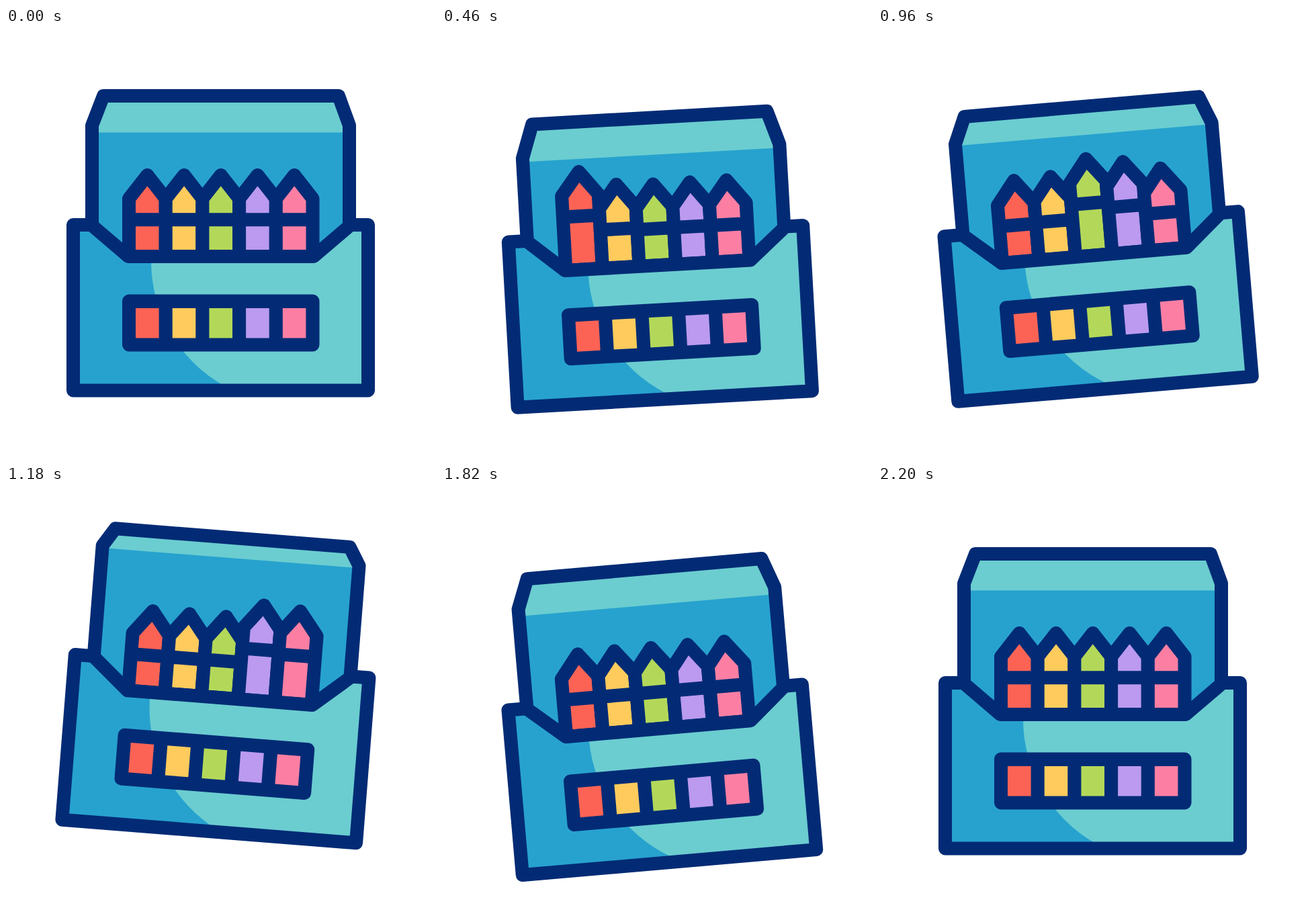
Animation, 640 px wide and 640 px high, one loop 2.4 s. Source, as an HTML page:

```html
<!DOCTYPE html>
<html lang="en">
<head>
<meta charset="utf-8">
<title>Crayon box</title>
<style>
  html, body { margin: 0; width: 100%; height: 100%; overflow: hidden; background: #fff; }
  svg { display: block; width: 100%; height: 100%; }
  .line { stroke: #032b75; stroke-width: 20; stroke-linejoin: round; stroke-linecap: round; }
</style>
</head>
<body>
<svg viewBox="0 0 640 640">
  <g id="box">
    <path id="lid" fill="#6bcdd0"/>
    <path id="inside" fill="#27a2ce"/>
    <path id="lidLine" class="line" fill="none"/>
    <g id="crayons"></g>
    <path fill="#27a2ce" d="M100 293H127L182 340H458L513 293H539V539.5H100z"/>
    <path fill="#6bcdd0" d="M216 347A213 213 0 0 0 335 538H539V293H513L458 340H216z"/>
    <path class="line" fill="none" d="M100 293H127L182 340H458L513 293H539V539.5H100z"/>
    <rect x="173" y="396.5" width="293.5" height="85" rx="10" fill="#032b75"/>
    <g id="swatches"></g>
  </g>
</svg>
<script>
const LOOP = 2400, STEP = 20, START = 200;
const COLORS = ['#fd6355', '#fecb5c', '#b3d859', '#bb9af0', '#fc7fa3'];
const GAP = 54.7, RISE = 26, RISE_TIME = 300, STAGGER = 200;

// Keyframes are [time, value] pairs
const TURN = [[200, 0], [800, -8], [1400, 10], [1800, -5], [2200, 0]];
const SHIFT = [[200, 0], [700, 25], [1200, -25], [1700, 25], [2200, 0]];
const lidKeys = (rest, low, high) => [[200, rest], [700, low], [1200, high], [1700, rest]];
const LID_TOP = lidKeys(101, 137, 101);
const LID_CORNER = lidKeys(145, 192, 127.5);
const LID_FOLD = lidKeys(155.5, 193, 131);

const $ = id => document.getElementById(id);

function add(parent, tag, attrs) {
  const el = document.createElementNS('http://www.w3.org/2000/svg', tag);
  for (const name in attrs) el.setAttribute(name, attrs[name]);
  return parent.appendChild(el);
}

function at(keys, t) {
  if (t <= keys[0][0]) return keys[0][1];
  for (let i = 1; i < keys.length; i++) {
    const [t0, a] = keys[i - 1], [t1, b] = keys[i];
    if (t < t1) {
      const u = (t - t0) / (t1 - t0);
      return a + (b - a) * u * u * (3 - 2 * u);
    }
  }
  return keys[keys.length - 1][1];
}

const crayons = COLORS.map((fill, i) => {
  add($('swatches'), 'rect', { x: 193 + i * GAP, y: 417, width: 34.6, height: 44.5, fill });
  const begin = START + i * STAGGER, peak = begin + RISE_TIME;
  return {
    x: 183 + i * GAP,
    keys: [[begin, 0], [peak, RISE], [peak + RISE_TIME, 0]],
    path: add($('crayons'), 'path', { class: 'line', fill })
  };
});

function draw(t) {
  $('box').setAttribute('transform',
    `translate(0 ${at(SHIFT, t)}) rotate(${at(TURN, t)} 320 320)`);

  const top = at(LID_TOP, t), corner = at(LID_CORNER, t), fold = at(LID_FOLD, t);
  const lid = `M128 293V${corner}L145 ${top}H495L511 ${corner}V293`;
  $('lid').setAttribute('d', lid);
  $('lidLine').setAttribute('d', lid);
  $('inside').setAttribute('d', `M128 ${fold}H511V293L458 340H182L128 293z`);

  for (const { x, keys, path } of crayons) {
    const up = at(keys, t), right = x + GAP;
    path.setAttribute('d',
      `M${x} 340V${254 - up}L${x + GAP / 2} ${219 - up}L${right} ${254 - up}V340z` +
      `M${x} ${285.3 - up}H${right}`);
  }
}

function tick() {
  const t = performance.now() % LOOP;
  draw(t - t % STEP);
  requestAnimationFrame(tick);
}
tick();
</script>
</body>
</html>
```
